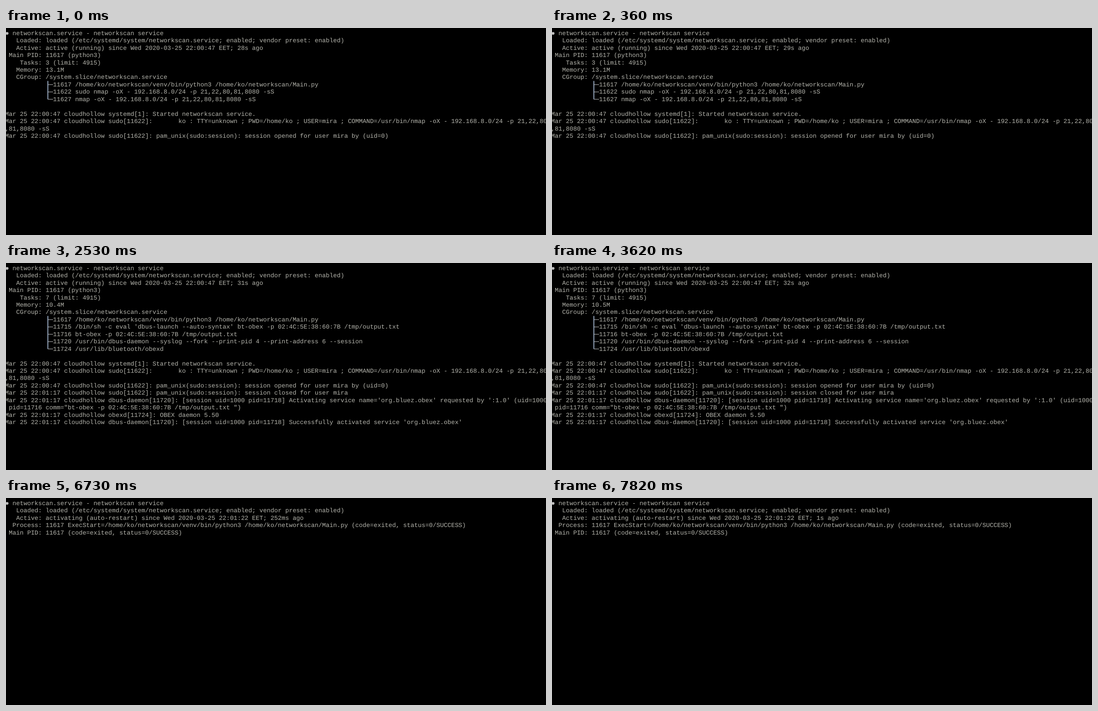
Recreate the animation shown at these times as an HTML page. Size 1206 by 464 pixels, loop 8000 ms.

```html
<!DOCTYPE html>
<html lang="en">
<head>
<meta charset="utf-8">
<title>Service status</title>
<style>
  html, body { margin: 0; width: 100%; height: 100%; overflow: hidden; background: #000; }
  svg { display: block; width: 1206px; height: 464px; }
  text {
    font: 13.73px "Liberation Mono", monospace;
    fill: #b4b4ac;
    white-space: pre;
    text-rendering: geometricPrecision;
  }
  circle { fill: #bbb; }
  path { fill: none; stroke: #bbb; stroke-width: 1.1; }
  .trunk { stroke: #b4c8e4; stroke-width: 1.7; }
</style>
</head>
<body>
<svg viewBox="0 0 1206 464"></svg>
<script>
const LOOP = 8000, LEFT = -2, BASELINE = 15.7, TOP = 3.5, ROW = 16.45;
const TREE_X = 93.5, TREE_END = 105;
const svg = document.querySelector('svg');

const host = 'cloudhollow', home = '/home/ko', mac = '02:4C:5E:38:60:7B';
const scan = 'nmap -oX - 192.168.8.0/24 -p 21,22,80,81,8080 -sS';
const python = `${home}/networkscan/venv/bin/python3 ${home}/networkscan/Main.py`;
const log = (time, message) => `Mar 25 22:${time} ${host} ${message}`;

const title = [
  '  networkscan.service - networkscan service',
  '   Loaded: loaded (/etc/systemd/system/networkscan.service; enabled; vendor preset: enabled)'
];
const main = '11617 ' + python;
const sudo = '11622 sudo ' + scan;
const scanning = [main, sudo, '11627 ' + scan];
const finishing = [main, sudo];
const sending = [
  main,
  `11715 /bin/sh -c eval 'dbus-launch --auto-syntax' bt-obex -p ${mac} /tmp/output.txt`,
  `11716 bt-obex -p ${mac} /tmp/output.txt`,
  '11720 /usr/bin/dbus-daemon --syslog --fork --print-pid 4 --print-address 6 --session',
  '11724 /usr/lib/bluetooth/obexd'
];

const startLog = [
  log('00:47', 'systemd[1]: Started networkscan service.'),
  log('00:47', `sudo[11622]:       ko : TTY=unknown ; PWD=${home} ; USER=mira ; COMMAND=/usr/bin/nmap -oX - 192.168.8.0/24 -p 21,22,80`),
  ',81,8080 -sS',
  log('00:47', 'sudo[11622]: pam_unix(sudo:session): session opened for user mira by (uid=0)')
];
const session = 'dbus-daemon[11720]: [session uid=1000 pid=11718] ';
const sendLog = [
  ...startLog,
  log('01:17', 'sudo[11622]: pam_unix(sudo:session): session closed for user mira'),
  log('01:17', session + "Activating service name='org.bluez.obex' requested by ':1.0' (uid=1000"),
  ` pid=11716 comm="bt-obex -p ${mac} /tmp/output.txt ")`,
  log('01:17', 'obexd[11724]: OBEX daemon 5.50'),
  log('01:17', session + "Successfully activated service 'org.bluez.obex'")
];

function running(age, tasks, memory, processes, journal) {
  const head = [
    ...title,
    `   Active: active (running) since Wed 2020-03-25 22:00:47 EET; ${age}s ago`,
    ' Main PID: 11617 (python3)',
    `    Tasks: ${tasks} (limit: 4915)`,
    `   Memory: ${memory}M`,
    '   CGroup: /system.slice/networkscan.service'
  ];
  const tree = processes.map(p => ' '.repeat(13) + p);
  return { lines: [...head, ...tree, '', ...journal], treeRow: head.length, treeSize: tree.length };
}

function restarting(age) {
  return {
    lines: [
      ...title,
      `   Active: activating (auto-restart) since Wed 2020-03-25 22:01:22 EET; ${age} ago`,
      `  Process: 11617 ExecStart=${python} (code=exited, status=0/SUCCESS)`,
      ' Main PID: 11617 (code=exited, status=0/SUCCESS)'
    ],
    treeSize: 0
  };
}

const screens = [
  [0, running(28, 3, '13.1', scanning, startLog)],
  [360, running(29, 3, '13.1', scanning, startLog)],
  [1450, running(30, 3, '14.0', finishing, startLog)],
  [2530, running(31, 7, '10.4', sending, sendLog)],
  [3620, running(32, 7, '10.5', sending, sendLog)],
  [4630, running(33, 7, '10.3', sending, sendLog)],
  [5720, running(34, 7, '10.3', sending, sendLog)],
  [6730, restarting('252ms')],
  [7820, restarting('1s')]
];

function add(tag, attributes, content = '') {
  const element = document.createElementNS('http://www.w3.org/2000/svg', tag);
  for (const name in attributes) element.setAttribute(name, attributes[name]);
  element.textContent = content;
  svg.append(element);
}

function draw({ lines, treeRow, treeSize }) {
  svg.replaceChildren();
  add('circle', { cx: 2.5, cy: 12, r: 3.1 });
  lines.forEach((line, row) => add('text', { x: LEFT, y: BASELINE + row * ROW }, line));
  if (!treeSize) return;
  const middle = i => TOP + (treeRow + i + 0.5) * ROW;
  for (let i = 0; i < treeSize; i++) add('path', { d: `M${TREE_X} ${middle(i)}H${TREE_END}` });
  add('path', { class: 'trunk', d: `M${TREE_X} ${middle(-0.5)}V${middle(treeSize - 1)}` });
}

let shown;
function tick() {
  const time = performance.now() % LOOP;
  const screen = screens.findLast(([start]) => start <= time)[1];
  if (screen !== shown) draw(shown = screen);
  requestAnimationFrame(tick);
}
tick();
</script>
</body>
</html>
```
